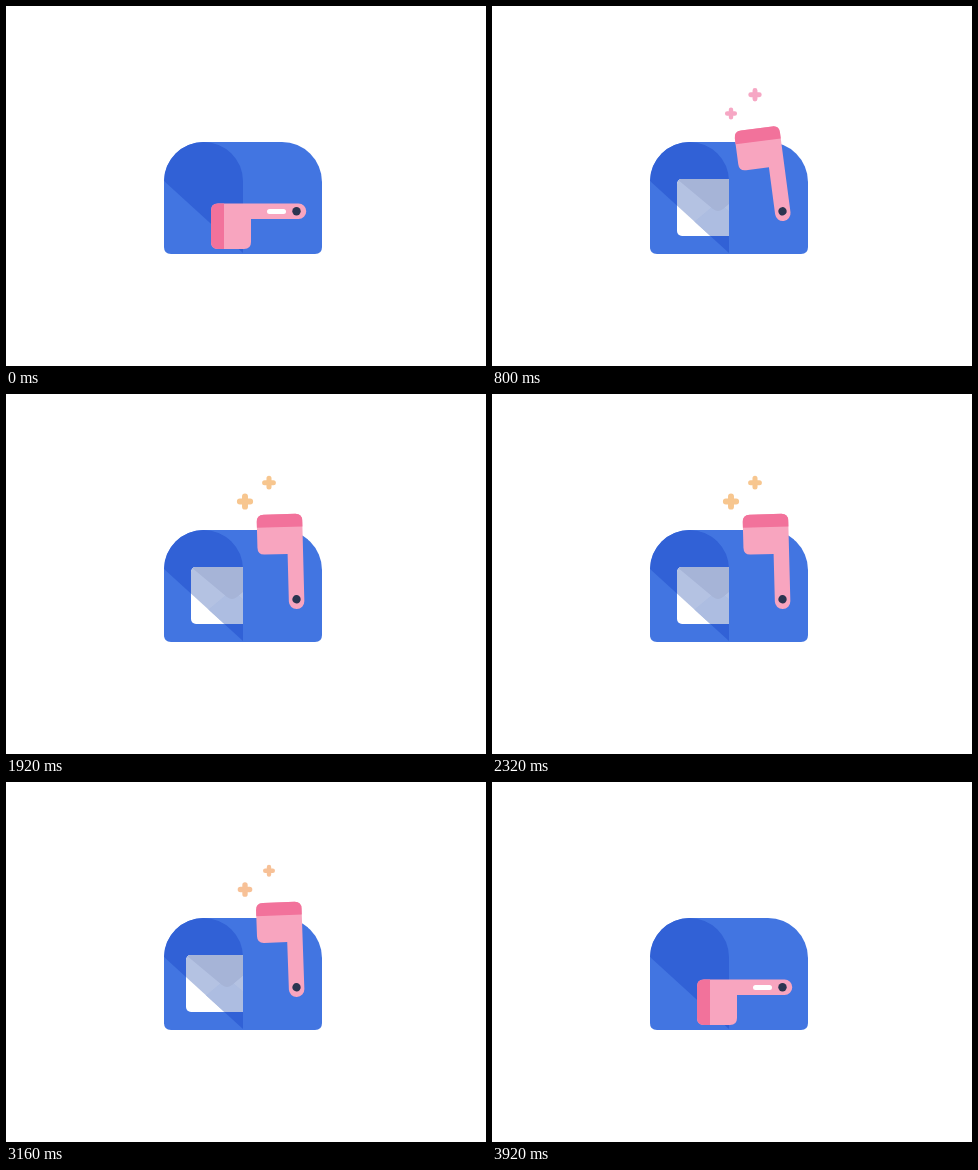
Write an HTML page that moves like this. It is 480 px wide and 360 px high and loops after 4.28 s.

```html
<!DOCTYPE html>
<html lang="en">
<head>
<meta charset="utf-8">
<title>Mailbox</title>
<style>
  html, body { margin: 0; width: 100%; height: 100%; overflow: hidden; background: #fff; }
  svg { display: block; width: 480px; height: 360px; }
</style>
</head>
<body>
<svg viewBox="0 0 480 360">
  <defs>
    <path id="door" d="M158 175A39.5 39 0 0 1 197.500 136A39.500 39 0 0 1 237 175V247Z"/>
    <clipPath id="inDoor"><use href="#door"/></clipPath>
    <clipPath id="leftSide"><rect width="237" height="360"/></clipPath>
    <clipPath id="paper"><rect width="82" height="57" rx="5"/></clipPath>
    <g id="spark" fill="none" stroke-linecap="round">
      <path d="M0 -3.800V3.800M-3.800 0H3.800" stroke-width="4.400"/>
      <path d="M0 -2.500L2.500 0L0 2.500L-2.500 0Z" stroke-width="1.500"/>
    </g>
  </defs>

  <path fill="#4275e1" d="M158 176A40 40 0 0 1 198 136H276A40 40 0 0 1 316 176V241Q316 248 309 248H165Q158 248 158 241Z"/>
  <use href="#door" fill="#3161d6"/>

  <g id="mail" clip-path="url(#leftSide)">
    <g class="letter"><g clip-path="url(#paper)">
      <rect width="82" height="57" fill="#fff"/>
      <path d="M0 0L36 30Q41 34 46 30L82 0Z" fill="#eef1fa"/>
    </g></g>
    <g clip-path="url(#inDoor)">
      <g class="letter"><g clip-path="url(#paper)">
        <rect width="82" height="57" fill="#b4c2e2"/>
        <path d="M0 57L36 27Q41 23 46 27L82 57Z" fill="#adbde1"/>
        <path d="M0 0L36 30Q41 34 46 30L82 0Z" fill="#a6b4d7"/>
      </g></g>
    </g>
  </g>

  <g id="trails" fill="none" stroke="#d0c4ed" stroke-width="7" stroke-linecap="round">
    <path pathLength="1" d="M144 192Q155 202 174 197.500"/>
    <path pathLength="1" d="M138.500 212Q158 219 177.500 213"/>
  </g>

  <g id="flag">
    <path fill="#f8a5bf" d="M212 197.500H292.500A7.700 7.700 0 0 1 292.500 213H245V236Q245 243 238 243H212Q205 243 205 236V204.500Q205 197.500 212 197.500Z"/>
    <path fill="#f2729b" d="M218 197.500H212Q205 197.500 205 204.500V236Q205 243 212 243H218Z"/>
    <rect id="shine" x="261" y="203" width="19" height="5" rx="2.500" fill="#fff"/>
    <circle cx="290.500" cy="205.300" r="4.200" fill="#2b3550"/>
  </g>

  <use id="sparkA" href="#spark"/>
  <use id="sparkB" href="#spark"/>
</svg>
<script>
const LOOP = 4280, STEP = 40;
const $ = id => document.getElementById(id);
const letters = document.querySelectorAll('.letter');
const trailPaths = document.querySelectorAll('#trails path');

// Each track is a list of [time, value], eased between neighbours.
const tracks = {
  angle: [[40, 0], [200, -6], [440, 36], [600, 103], [820, 82], [1080, 95], [1320, 92],
          [1600, 88.5], [3040, 88.5], [3160, 88], [3440, 0], [3560, -6], [3720, 1.5], [3880, 0]],
  mailX: [[80, 82], [440, 181], [560, 187], [720, 185], [3000, 185], [3160, 180], [3240, 180], [3520, 240]],
  mailY: [[80, 156], [320, 178], [440, 176], [600, 173]],
  mailFade: [[40, 0], [160, 1], [3480, 1], [3520, 0]],
  trailFade: [[80, 0], [160, 1], [440, 1], [560, 0]],
  trailStart: [[440, 0], [560, 0.9]],
  trailEnd: [[80, 0.05], [280, 1]],
  sizeA: [[520, 0], [760, 1], [1040, 1.2], [1320, 0.87], [1720, 1.35], [2960, 1.35], [3160, 1.22], [3400, 0]],
  sizeB: [[480, 0], [720, 1.1], [1000, 1.2], [1320, 1], [1720, 1.15], [2960, 1.15], [3160, 1], [3400, 0]],
  hue: [[1280, 0], [1680, 1], [2960, 1], [3160, 0.85], [3360, 0.2]],
  shine: [[0, 1], [120, 0], [3800, 0], [3920, 1]]
};

function at(name, t) {
  const keys = tracks[name];
  if (t <= keys[0][0]) return keys[0][1];
  for (let i = 1; i < keys.length; i++) {
    const [t0, v0] = keys[i - 1], [t1, v1] = keys[i];
    if (t <= t1) {
      const p = (t - t0) / (t1 - t0);
      return v0 + (v1 - v0) * p * p * (3 - 2 * p);
    }
  }
  return keys[keys.length - 1][1];
}

function mix(a, b, p) {
  return `rgb(${a.map((v, i) => Math.round(v + (b[i] - v) * p))})`;
}

function setSpark(el, x, y, size, color) {
  el.setAttribute('transform', `translate(${x} ${y}) scale(${size})`);
  el.setAttribute('stroke', color);
  el.style.display = size > 0.01 ? '' : 'none';
}

function draw(t) {
  const x = at('mailX', t), y = at('mailY', t);
  letters.forEach(el => el.setAttribute('transform', `translate(${x} ${y})`));
  $('mail').style.opacity = at('mailFade', t);

  $('trails').setAttribute('transform', `translate(${x - 181} ${y - 176})`);
  $('trails').style.opacity = at('trailFade', t);
  const start = at('trailStart', t), end = at('trailEnd', t);
  trailPaths.forEach(el => el.setAttribute('stroke-dasharray', `0 ${start} ${end - start} 2`));
  if (start === 0) trailPaths.forEach(el => el.setAttribute('stroke-dasharray', `${end} 2`));

  $('flag').setAttribute('transform', `rotate(${at('angle', t)} 290.5 205.3)`);
  $('shine').style.opacity = at('shine', t);

  const color = mix([246, 167, 196], [247, 198, 143], at('hue', t));
  setSpark($('sparkA'), 239, 107.5, at('sizeA', t), color);
  setSpark($('sparkB'), 263, 88.7, at('sizeB', t), color);
}

const began = performance.now();
function tick() {
  const t = (performance.now() - began) % LOOP;
  draw(Math.floor(t / STEP) * STEP);
  requestAnimationFrame(tick);
}
draw(0);
requestAnimationFrame(tick);
</script>
</body>
</html>
```
